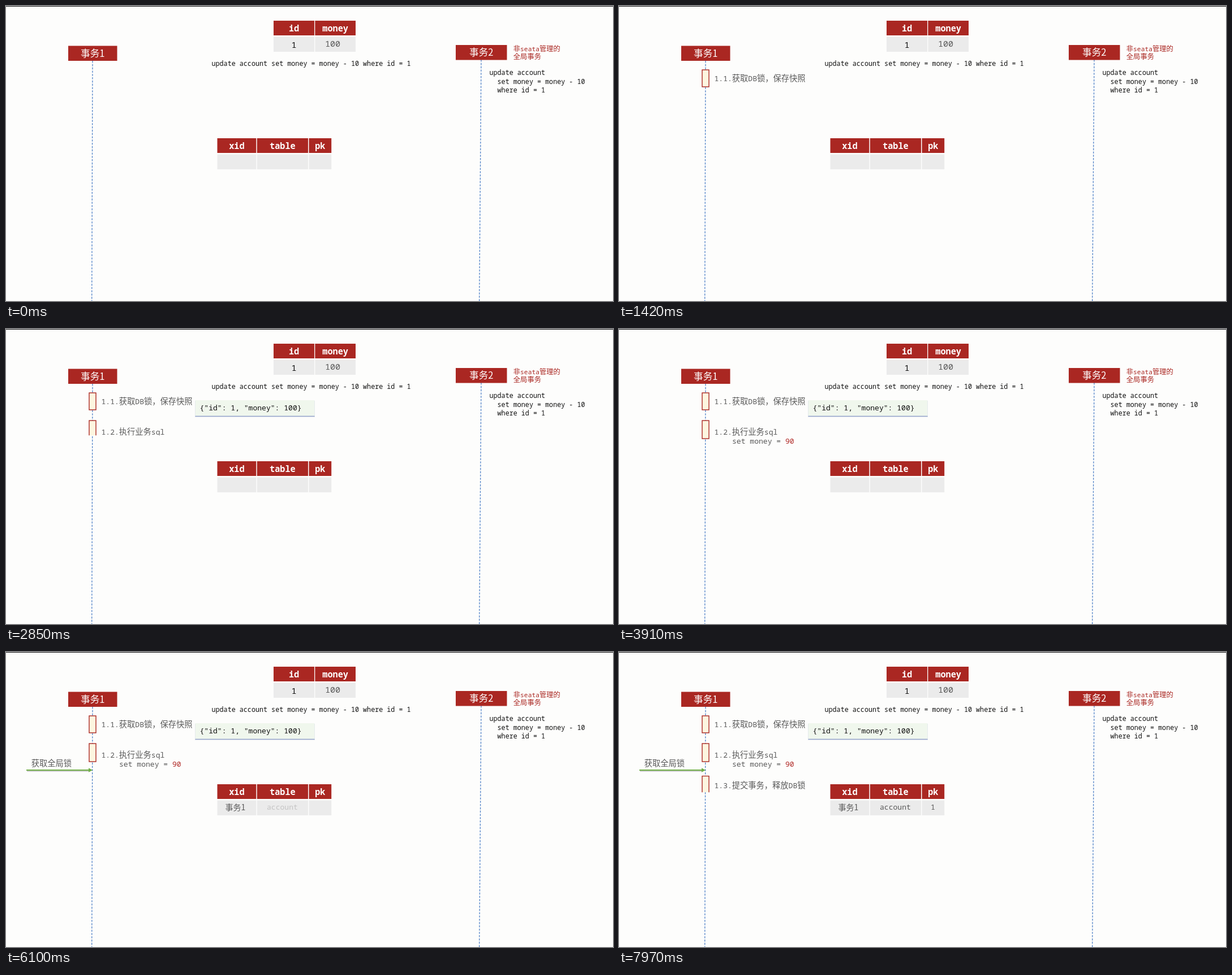
An HTML page that plays this animation: 1073x522 px, repeating every 8000 ms.

```html
<!DOCTYPE html>
<html lang="zh-CN">
<head>
<meta charset="utf-8">
<style>
  html, body { margin: 0; width: 100%; height: 100%; overflow: hidden; background: #fdfdfc; }
  svg { display: block; }
  text { white-space: pre; font-family: "Noto Sans CJK SC", "Noto Sans CJK", "Noto Sans CJK JP", sans-serif; }
  .mono { font-family: "Noto Sans Mono", monospace; }
</style>
</head>
<body>
<svg id="stage" width="1073" height="522" viewBox="0 0 1073 522"></svg>
<script>
const LOOP = 8000, RED = '#aa2722', GREY = '#595959', BLACK = '#111';
const stage = document.getElementById('stage');
const steps = [];

// Latin runs are set in a monospaced face 0.55 em wide, next to full-width Chinese.
const runs = (str, size) => str.replace(/[\x20-\x7e]+/g,
  run => `<tspan class="mono" font-size="${size * 0.9163}">${run}</tspan>`);

const text = (x, y, size, str, fill = GREY, extra = '') =>
  `<text x="${x}" y="${y}" font-size="${size}" fill="${fill}" ${extra}>${runs(str, size)}</text>`;

const centered = (x, y, size, str, fill, extra = '') =>
  text(x, y, size, str, fill, 'text-anchor="middle" ' + extra);

const rect = (x, y, w, h, fill, extra = '') =>
  `<rect x="${x}" y="${y}" width="${w}" height="${h}" fill="${fill}" ${extra}/>`;

const bar = (y, h) => rect(147, y, 12, h, '#fdf6df', `stroke="${RED}" stroke-width="1.4"`);

const lifeline = (x1, y1, x2) =>
  `<path d="M${x1} ${y1}L${x2} 522" stroke="#4f81c7" stroke-width="1.3" stroke-dasharray="3.6 2.2"/>`;

const actor = (x, y, w, name) => rect(x, y, w, 26.5, RED) +
  `<text x="${x + w / 2}" y="${y + 19.3}" font-size="16.6" fill="#fff" text-anchor="middle">${name}</text>`;

const table = (y, columns) => columns.map(([x, w, title]) =>
  rect(x, y, w, 26, RED) + rect(x, y + 28.5, w, 26.5, '#ebebeb') +
  centered(x + w / 2, y + 19, 16.6, title, '#fff', 'font-weight="700"')).join('');

const add = markup => stage.insertAdjacentHTML('beforeend', markup);

function fade(start, markup) {
  add(`<g>${markup}</g>`);
  const group = stage.lastElementChild;
  steps.push({ start, show: p => group.setAttribute('opacity', p) });
}

// Uncovers a box along one side: 'height' from the top, 'width' from the left.
function wipe(start, side, [x, y, w, h], markup) {
  const id = 'wipe' + start;
  add(`<g clip-path="url(#${id})"><clipPath id="${id}">${rect(x, y, w, h, '#000')}</clipPath>${markup}</g>`);
  const mask = stage.lastElementChild.querySelector('rect');
  const full = side === 'height' ? h : w;
  steps.push({ start, show: p => mask.setAttribute(side, full * p) });
}

add(rect(0, 0, 1073, 1, '#111') +
  lifeline(153, 97, 151.7) + lifeline(840, 95, 836.7) +
  actor(110, 70.5, 86.5, '事务1') + actor(795, 69, 90.5, '事务2') +
  table(26, [[473, 72, 'id'], [546.3, 71.7, 'money']]) +
  table(234, [[373.5, 68.8, 'xid'], [443.8, 90.2, 'table'], [535.5, 39.7, 'pk']]) +
  centered(509, 73.5, 16.4, '1', BLACK) + centered(577.5, 72, 16.4, '100') +
  text(363.5, 105.5, 12.82, 'update account set money = money - 10 where id = 1', BLACK) +
  text(896.8, 80, 12.3, '非seata管理的', RED) + text(896.8, 94.3, 12.3, '全局事务', RED) +
  ['update account', '  set money = money - 10', '  where id = 1']
    .map((line, i) => text(854.5, 122 + i * 15.5, 12.82, line, BLACK)).join(''));

wipe(680, 'height', [140, 112, 192, 32.5],
  bar(113, 30) + text(168.5, 133, 14.26, '1.1.获取DB锁，保存快照'));

fade(1560,
  rect(334, 127, 212, 29, '#8795c0', 'opacity=".3"') +
  rect(334.5, 126, 211, 28.5, '#f0f7ed') +
  rect(334.5, 153.7, 211, 1.3, '#96a5cb') +
  text(342.5, 144.3, 14.26, '{"id": 1, "money": 100}', BLACK));

wipe(2560, 'height', [140, 161, 192, 47],
  bar(162, 32) + text(168.5, 187, 14.26, '1.2.执行业务sql') +
  text(200, 203.3, 14.26, 'set money = ') +
  text(294, 203.3, 14.26, '90', '#b02a27'));

wipe(3920, 'width', [34, 186, 121, 30],
  text(44.8, 202, 14.26, '获取全局锁') +
  rect(37, 210, 110, 1.8, '#000', 'opacity=".2"') +
  rect(36, 208, 112, 2, '#70ad47') +
  '<path d="M146 205.3L153 209L146 212.7Z" fill="#70ad47"/>');

fade(5480, `<text x="387.5" y="279.8" font-size="14" fill="${GREY}">事务1</text>`);
fade(5970, text(461, 278.5, 14.26, 'account'));
fade(6460, centered(555, 278.5, 14.26, '1'));

wipe(7540, 'height', [140, 218.5, 192, 34.5],
  bar(219.5, 32.5) + text(168.5, 241, 14.26, '1.3.提交事务，释放DB锁'));

function draw() {
  const t = performance.now() % LOOP;
  for (const { start, show } of steps) show(Math.min(1, Math.max(0, (t - start) / 500)));
  requestAnimationFrame(draw);
}
draw();
</script>
</body>
</html>
```
